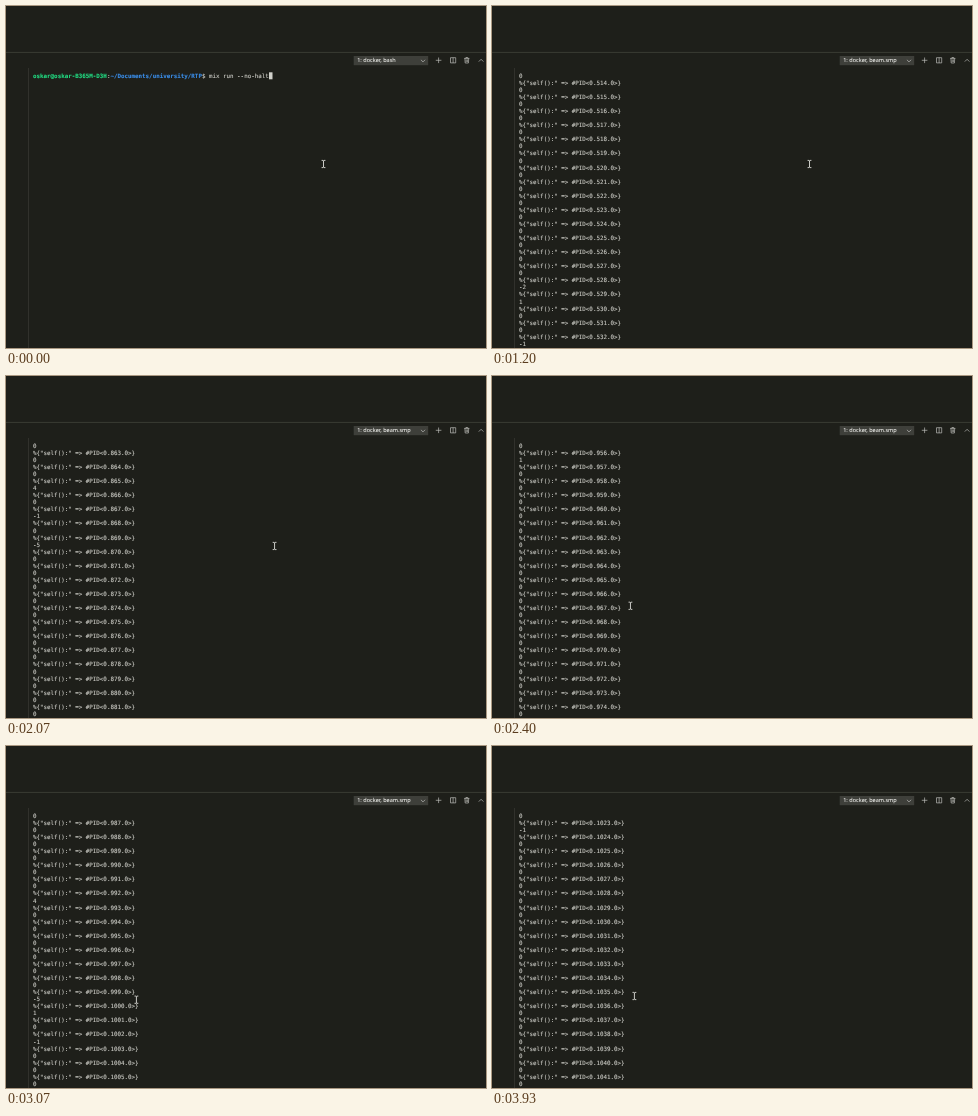
Recreate the animation shown at these times as an HTML page. Size 480x342 px, loop 3.99 s.

```html
<!DOCTYPE html>
<html lang="en">
<head>
<meta charset="utf-8">
<title>Terminal</title>
<style>
  html, body { margin: 0; width: 100%; height: 100%; overflow: hidden; background: #1e1f1a; }
  svg { display: block; width: 100vw; height: 100vh; }
  text { text-rendering: geometricPrecision; white-space: pre; }
  .mono { font: 5.85px "DejaVu Sans Mono", monospace; fill: #d0d0ca; stroke: #d0d0ca; stroke-width: .1; }
  .label { font: 5.55px "Noto Sans", "Open Sans", sans-serif; fill: #f4f4f0; stroke: #f4f4f0; stroke-width: .06; }
  .user { font-weight: bold; fill: #22de84; stroke: #22de84; }
  .path { font-weight: bold; fill: #3b8eea; stroke: #3b8eea; }
  .icon { fill: none; stroke: #c8c8c4; stroke-width: .65; }
</style>
</head>
<body>
<svg viewBox="0 0 480 342">
  <rect width="480" height="342" fill="#1e1f1a"/>
  <path d="M0 46.4H480" stroke="#414339" stroke-width=".8"/>
  <path d="M22.5 62V342" stroke="#363732" stroke-width=".8"/>

  <rect x="347.7" y="50" width="74.5" height="9.2" fill="#3e3f3a"/>
  <text id="label" class="label" x="351.2" y="56.4"></text>
  <g class="icon">
    <path d="M414.9 53.8l2.1 2.1 2.1-2.1"/>
    <path d="M429.8 54.3h5.6M432.6 51.5v5.6"/>
    <path d="M444.5 51.7h5.2v5.2h-5.2zM447.1 51.7v5.2"/>
    <path d="M458.2 52.4h5.2M459.9 52.4v-.9h1.8v.9M458.9 52.4l.3 4.6h3.2l.3-4.6M460.2 53.4v2.6M461.4 53.4v2.6"/>
    <path d="M472.8 55.6l2.3-2.3 2.3 2.3"/>
  </g>

  <g id="prompt">
    <text class="mono" x="27" y="71.9"><tspan class="user">oskar@oskar-B365M-D3H</tspan>:<tspan class="path">~/Documents/university/RTP</tspan>$ mix run --no-halt</text>
    <rect id="cursor" width="3.5" height="7" fill="#d0d0ca"/>
  </g>
  <g id="output"></g>

  <path id="mouse" d="M-1.9-3.6h1.4l.5.4.5-.4h1.4M0-3.2v6.4M-1.9 3.6h1.4l.5-.4.5.4h1.4" fill="none" stroke="#dededa" stroke-width=".9"/>
</svg>
<script>
const LOOP = 3990, ROWS = 39, TOP = 66.3, LINE = 7.05;
const ENTER = 4, BOOT = 7, FLOOD = 9, CAUGHT_UP = 36;

const $ = id => document.getElementById(id);
const lerp = (a, b, u) => a + (b - a) * u;
const ramp = (tick, from, to) => Math.min(1, Math.max(0, (tick - from) / (to - from)));

// A backlog drains quickly, then a slow trickle takes over; both lose pace gently.
function newestPid(tick) {
  const flood = tick - FLOOD, trickle = tick - CAUGHT_UP;
  return Math.round(Math.min(
    247 + 33.65 * flood - .2205 * flood ** 2,
    974 + 3.244 * trickle - .0144 * trickle ** 2));
}

// Mostly zero, with a few small positive or negative values.
function score(pid) {
  const s = Math.sin(pid * 12.9898) * 43758.5453;
  const spread = 2 * (s - Math.floor(s)) - 1;
  return Math.round(6 * spread ** 15);
}

// A sweep to the lower left that brakes sideways, then a short nudge right.
function mouseAt(tick) {
  const sweep = ramp(tick, 30, 38), nudge = ramp(tick, 54, 59);
  const x = lerp(317.5, 130.4, 1 - (1 - sweep) ** 2.27);
  const y = lerp(158, 253.7, sweep);
  return [x + 12 * nudge, y - 3.7 * nudge];
}

const rows = Array.from({ length: ROWS }, (_, i) => {
  const row = document.createElementNS("http://www.w3.org/2000/svg", "text");
  row.setAttribute("class", "mono");
  row.setAttribute("x", 27);
  row.setAttribute("y", TOP + 5.6 + i * LINE);
  return $("output").appendChild(row);
});

function draw(tick) {
  const program = tick < ENTER ? "bash" : tick < BOOT ? "mix" : "beam.smp";
  $("label").textContent = "1: docker, " + program;

  const flooding = tick >= FLOOD;
  $("prompt").style.display = flooding ? "none" : "";
  $("output").style.display = flooding ? "" : "none";
  $("cursor").setAttribute("x", tick < ENTER ? 263 : 27);
  $("cursor").setAttribute("y", TOP + (tick < ENTER ? 0 : LINE));

  if (flooding) {
    const first = newestPid(tick) - (ROWS - 1) / 2;
    rows.forEach((row, i) => {
      const pid = first + Math.ceil(i / 2);
      row.textContent = i % 2 ? `%{"self():" => #PID<0.${pid}.0>}` : score(pid);
    });
  }
  $("mouse").setAttribute("transform", `translate(${mouseAt(tick)})`);
}

let shown = -1;
function frame() {
  // 15 ticks per second
  const tick = Math.floor((performance.now() % LOOP) * 3 / 200 + .06);
  if (tick !== shown) draw(shown = tick);
  requestAnimationFrame(frame);
}
frame();
</script>
</body>
</html>
```
